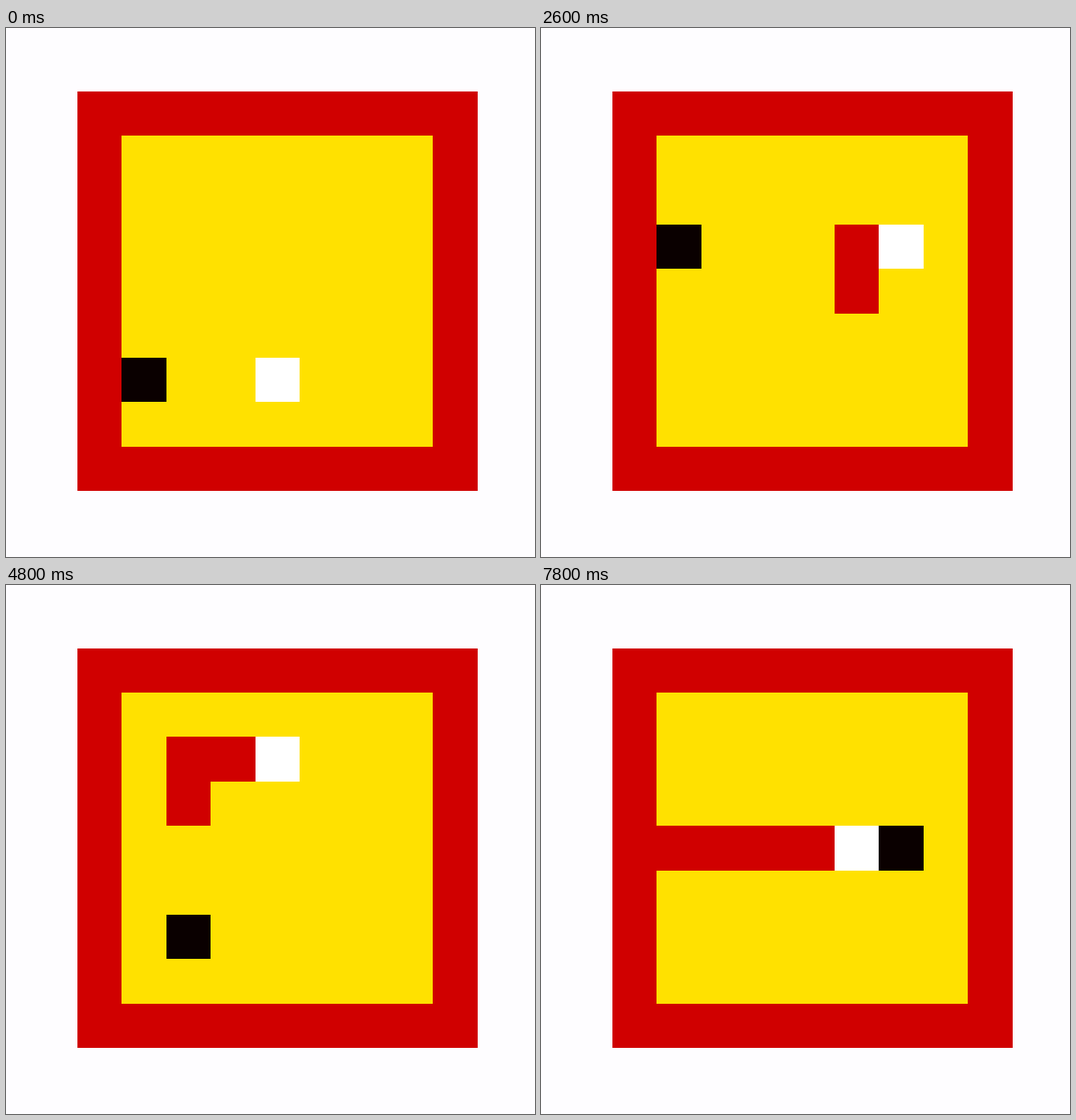
Animation, 600 px wide and 600 px high, one loop 8 s. Source, as an HTML page with a canvas:

```html
<!DOCTYPE html>
<html lang="en">
<head>
<meta charset="utf-8">
<title>Snake</title>
<style>
  html, body { margin: 0; width: 100%; height: 100%; overflow: hidden; background: #fefdff; }
  canvas { display: block; }
</style>
</head>
<body>
<canvas id="stage" width="600" height="600"></canvas>
<script>
const ctx = document.getElementById('stage').getContext('2d');
const STEP = 200;
const COLORS = { page: '#fefdff', wall: '#d00000', floor: '#ffe100', body: '#d00000', head: '#ffffff', food: '#0a0000' };
const MOVES = { U: [0, -1], D: [0, 1], L: [-1, 0], R: [1, 0] };
const ROUTE = 'ULLDL' + 'URRURRUR' + 'DLLLLLU' + 'RURRRDDLDDLL' + 'LUURRRR';
const FOODS = [[0, 5], [5, 2], [0, 2], [1, 5], [5, 3]];

// Head cell at every step; column and row count from the inner top left cell.
const path = [[3, 5]];
for (const move of ROUTE) {
  const [x, y] = path[path.length - 1];
  const [dx, dy] = MOVES[move];
  path.push([x + dx, y + dy]);
}

// Number of meals eaten at every step.
let meals = 0;
const eaten = path.map(([x, y]) => {
  const [fx, fy] = FOODS[meals];
  if (x === fx && y === fy) meals++;
  return meals;
});

const edgeX = col => Math.round(131.4 + col * 50.4);
const edgeY = row => Math.round(121.9 + row * 50.4);

function fillCells(color, [col, row], size = 1) {
  const x = edgeX(col), y = edgeY(row);
  ctx.fillStyle = color;
  ctx.fillRect(x, y, edgeX(col + size) - x, edgeY(row + size) - y);
}

function draw(time) {
  const step = Math.floor(time / STEP) % path.length;
  const length = 1 + eaten[step];
  ctx.fillStyle = COLORS.page;
  ctx.fillRect(0, 0, 600, 600);
  fillCells(COLORS.wall, [-1, -1], 9);
  fillCells(COLORS.floor, [0, 0], 7);
  fillCells(COLORS.food, FOODS[eaten[step]]);
  for (const cell of path.slice(Math.max(0, step - length + 1), step)) fillCells(COLORS.body, cell);
  fillCells(COLORS.head, path[step]);
}

const start = performance.now();
function tick() {
  draw(performance.now() - start);
  requestAnimationFrame(tick);
}
tick();
</script>
</body>
</html>
```
